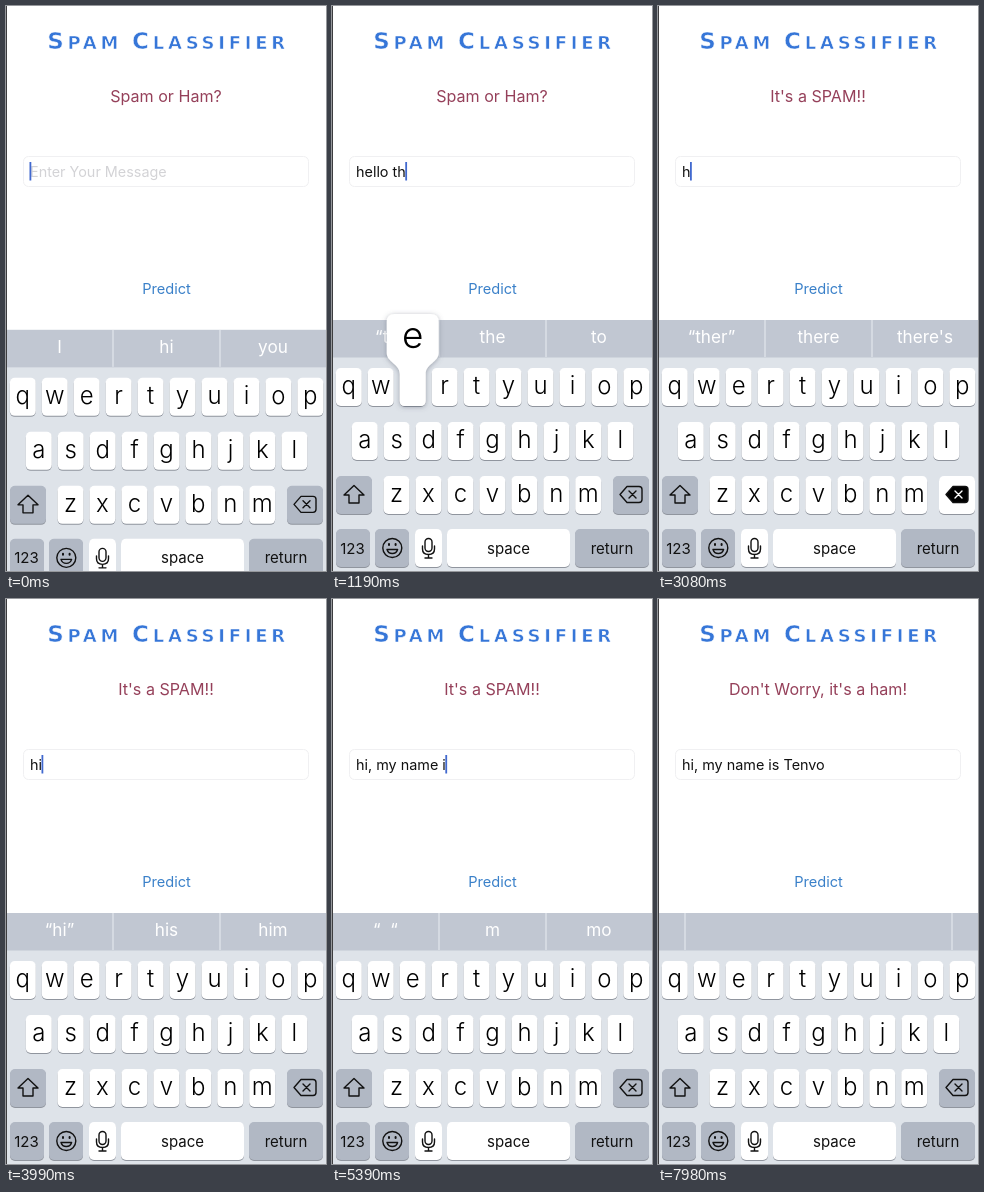
Write an HTML page that moves like this. It is 320 by 565 pixels and loops after 8000 ms.

```html
<!DOCTYPE html>
<html lang="en">
<head>
<meta charset="utf-8">
<title>Spam Classifier</title>
<style>
  html, body { margin: 0; width: 100%; height: 100%; overflow: hidden; background: #fff; }
  svg { display: block; width: 100%; height: 100%; font-family: Inter, Roboto, sans-serif; }
  text { white-space: pre; }
  .mid { text-anchor: middle; }
  .title { font: bold 18px "DejaVu Sans", sans-serif; letter-spacing: 3.75px; fill: #3676d8; stroke: #fff; stroke-width: .6px; }
  .title .cap { font-size: 23px; }
  .result { font-size: 16.1px; fill: #95405a; }
  .field { font-size: 14.4px; }
  .predict { font-size: 14.6px; fill: #3a80c9; }
  .sug { font-size: 17.2px; fill: #fff; }
  .cap-l { font-size: 24px; font-weight: 300; fill: #000; }
  .label { font-size: 15px; fill: #111; }
  .icon { fill: none; stroke: #111; stroke-width: 1.4; stroke-linejoin: round; stroke-linecap: round; }
</style>
</head>
<body>
<svg viewBox="0 0 320 565" preserveAspectRatio="none">
  <defs>
    <filter id="soft" x="-40%" y="-20%" width="180%" height="140%">
      <feDropShadow dx="0" dy="1" stdDeviation="2.5" flood-color="#596170" flood-opacity=".5"/>
    </filter>
  </defs>
  <rect width="320" height="565" fill="#fff"/>
  <text class="title mid" x="162" y="43"><tspan class="cap">S</tspan>PAM <tspan class="cap">C</tspan>LASSIFIER</text>
  <text class="result mid" id="result" x="160" y="96"></text>
  <rect x="17.5" y="150.5" width="285" height="30" rx="5" fill="#fff" stroke="#f0f0f2"/>
  <text class="field" id="hint" x="24" y="171" fill="#d3d3d6">Enter Your Message</text>
  <text class="field" id="field" x="24" y="171" fill="#111"></text>
  <rect id="caret" y="156" width="1.8" height="18.5" fill="#4169cf"/>
  <text class="predict mid" id="predict" x="160.5" y="288">Predict</text>
  <g id="board">
    <rect y="314" width="320" height="262" fill="#dee3e9"/>
    <rect y="314" width="320" height="37.5" fill="#c1c7d2"/>
    <rect id="divL" y="314" width="1" height="37" fill="#e9edf2"/>
    <rect id="divR" y="314" width="1" height="37" fill="#e9edf2"/>
    <g id="sugs"></g>
    <g id="keys"></g>
    <path class="icon" d="M22 479.500l10 9.500h-5v8h-10v-8h-5z"/>
    <g id="del" class="icon">
      <path id="delBody" d="M295 480.500h12q3 0 3 3v10q0 3-3 3h-12l-7-8z"/>
      <path id="delCross" d="M297 485l7 7m0-7l-7 7"/>
    </g>
    <g class="icon">
      <circle cx="60.300" cy="542" r="9.500"/>
      <path d="M55 543.500h10.600q-1.200 4-5.300 4t-5.300-4z"/>
      <path d="M57 538v1m6.600-1v1" stroke-width="2"/>
    </g>
    <g class="icon">
      <rect x="93" y="532.500" width="7" height="13" rx="3.500"/>
      <path d="M90.500 540v3q0 5.500 6 5.500t6-5.500v-3M96.500 548.500v3.500m-3.500 0h7"/>
    </g>
    <g id="pop">
      <path d="M-18-54h36q8 0 8 8v31c0 9-13 11-13 21v27q0 5-5 5h-16q-5 0-5-5v-27c0-10-13-12-13-21v-31q0-8 8-8z" fill="#fff" filter="url(#soft)"/>
      <text class="mid" id="popText" y="-20" font-size="37" font-weight="300" fill="#000"></text>
    </g>
  </g>
  <rect width="1" height="565" fill="#3d3d3f"/>
</svg>
<script>
const LOOP = 8000;
const $ = id => document.getElementById(id);
const clamp = v => Math.max(0, Math.min(1, v));
const easeOut = v => 1 - (1 - clamp(v)) ** 2;

function add(parent, tag, attrs, text) {
  const el = document.createElementNS('http://www.w3.org/2000/svg', tag);
  for (const k in attrs) el.setAttribute(k, attrs[k]);
  if (text) el.textContent = text;
  return parent.appendChild(el);
}

// Keyboard
const GREY = '#b1b8c4';
const spots = {};
function key(x, y, w, fill) {
  add($('keys'), 'rect', { x, y: y + 1, width: w, height: 38, rx: 5, fill: '#90959e' });
  return add($('keys'), 'rect', { x, y, width: w, height: 38, rx: 5, fill });
}
function row(letters, x0, y) {
  [...letters].forEach((ch, i) => {
    const x = x0 + i * 31.95;
    key(x, y, 26, '#fff');
    add($('keys'), 'text', { class: 'cap-l mid', x: x + 13, y: y + 26 }, ch);
    spots[ch] = [x + 13, y];
  });
}
function label(text, x) {
  add($('keys'), 'text', { class: 'label mid', x, y: 547.5 }, text);
}
row('qwertyuiop', 3.8, 362);
row('asdfghjkl', 19.8, 416);
row('zxcvbnm', 51.5, 470);
key(4, 470, 36, GREY);
const delKey = key(281, 470, 36, GREY);
key(4, 523, 34, GREY);
key(43, 523, 34, GREY);
key(83, 523, 27, '#fff');
const spaceKey = key(115, 523, 123, '#fff');
key(243, 523, 74, GREY);
label('123', 20.5);
label('space', 176.5);
label('return', 280);

// Typing: each stroke is [time, resulting text, key]
const strokes = [[0, '', '']];
function type(chars, times) {
  [...chars].forEach((ch, i) => {
    strokes.push([times[i], strokes[strokes.length - 1][1] + ch, ch]);
  });
}
type('hello there', [190, 310, 430, 560, 700, 860, 1000, 1110, 1220, 1340, 1450]);
for (let i = 0; i < 11; i++) {
  const at = i ? 2370 + (i - 1) * 85 : 2170;
  strokes.push([at, 'hello there'.slice(0, 10 - i), '']);
}
type('hi, my name is Tenvo', [3400, 3560, 4000, 4200, 4750, 4840, 4920, 5000, 5070,
  5150, 5220, 5300, 5370, 5480, 5600, 5850, 6020, 6350, 6480, 6620]);

const results = [[0, 'Spam or Ham?'], [1940, "It's a SPAM!!"], [7140, "Don't Worry, it's a ham!"]];
const taps = [[1780, 1940], [7000, 7140]];
const suggestions = [
  [0, 'I|hi|you'], [260, '“h”|hi|he'], [720, '“hello”|hello|hell'], [930, 'I|there|and'],
  [1060, '“t”|the|to'], [1300, '“the”|there|them'], [1520, "“there”|there's|therefore"],
  [2560, "“ther”|there|there's"], [3220, 'I|hi|you'], [3460, '“h”|hi|he'],
  [3640, '“hi”|his|him'], [4270, 'I|am|there'], [4830, '“m”|my|me'],
  [5040, '“  “|m|mo'], [5460, '“i”|is|in'], [5670, 'the|a|not'],
  [5920, '“T”|The|To'], [6120, '“Te”|Ten|Tell'], [6700, '“Tenvo”|Tent|Tend'], [7780, '||']
];
const words = [53.5, 160.5, 267].map(x => add($('sugs'), 'text', { class: 'sug mid', x, y: 337 }));

const current = (list, t) => list.reduce((a, b) => b[0] <= t ? b : a);
const pen = document.createElement('canvas').getContext('2d');
const set = (el, k, v) => el.setAttribute(k, v);
const show = (el, on) => { el.style.display = on ? '' : 'none'; };

function predictOpacity(t) {
  let o = 1;
  for (const [down, up] of taps) {
    if (t >= down) o = t < up ? 0.3 : 0.3 + 0.7 * clamp((t - up) / 300) ** 1.5;
  }
  return o;
}

function render(t) {
  set($('board'), 'transform', `translate(0 ${10 * (1 - easeOut(t / 130))})`);
  $('result').textContent = current(results, t)[1];
  set($('predict'), 'opacity', predictOpacity(t));

  const [at, text] = current(strokes, t);
  $('field').textContent = text;
  show($('hint'), !text);
  pen.font = '14.4px Inter, Roboto, sans-serif';
  set($('caret'), 'x', 23.5 + pen.measureText(text).width);
  show($('caret'), t < 7780 && (t - at) % 1000 < 550);

  const next = strokes.find(s => s[0] > t && s[0] - t <= 85);
  const ch = next ? next[2] : '';
  const spot = spots[ch.toLowerCase()];
  show($('pop'), spot);
  if (spot) {
    set($('pop'), 'transform', `translate(${spot})`);
    $('popText').textContent = ch;
  }
  set(spaceKey, 'fill', ch === ' ' ? GREY : '#fff');

  const erasing = t >= 2130 && t < 3190;
  set(delKey, 'fill', erasing ? '#fff' : GREY);
  set($('delBody'), 'fill', erasing ? '#000' : 'none');
  set($('delCross'), 'stroke', erasing ? '#fff' : '#111');

  current(suggestions, t)[1].split('|').forEach((w, i) => { words[i].textContent = w; });
  const spread = 80 * easeOut((t - 7780) / 200);
  set($('divL'), 'x', 106.5 - spread);
  set($('divR'), 'x', 213.5 + spread);
}

function tick(now) {
  render(now % LOOP);
  requestAnimationFrame(tick);
}
render(0);
requestAnimationFrame(tick);
</script>
</body>
</html>
```
